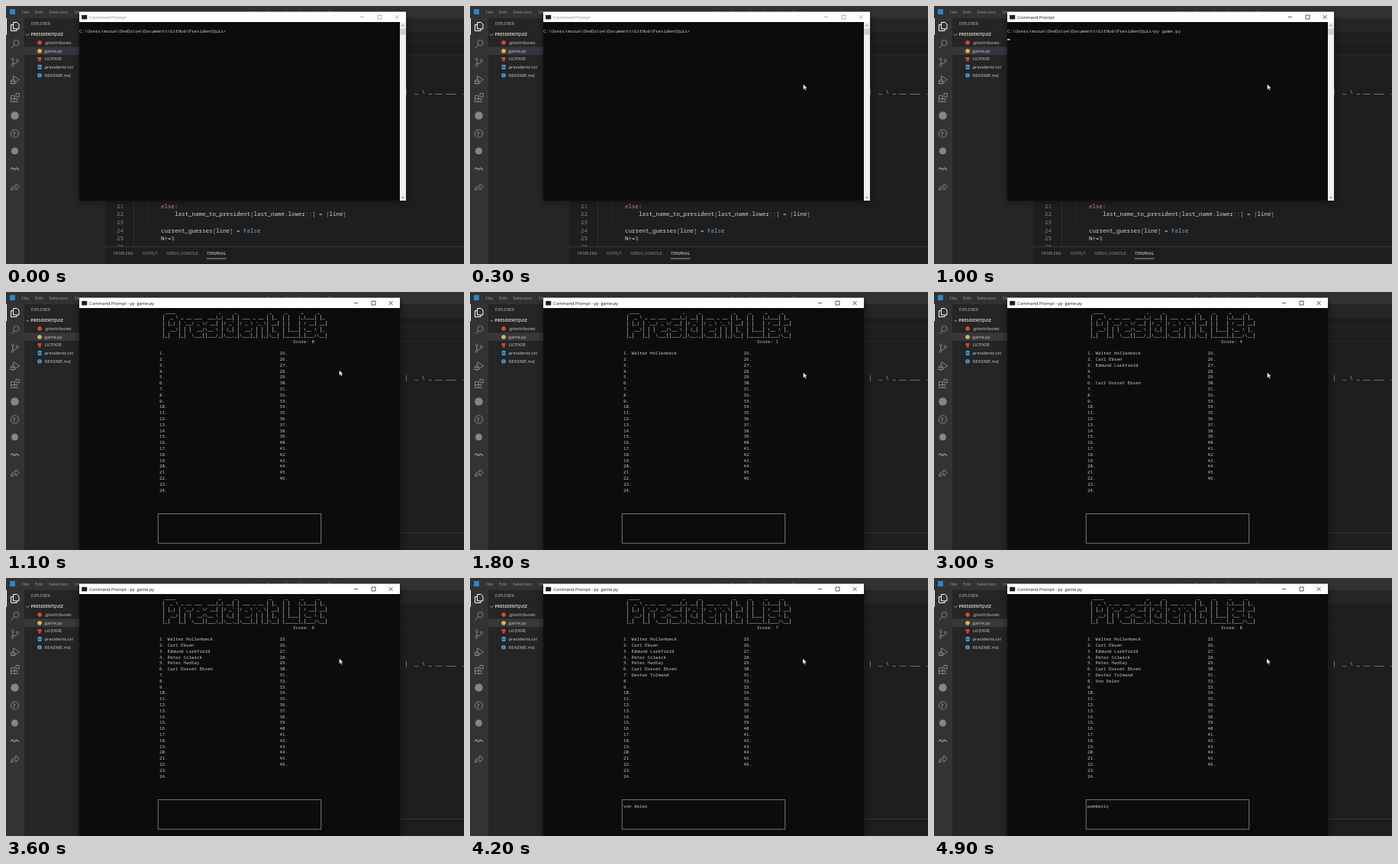
Write an HTML page with a canvas that moves like this. It is 600 by 338 pixels and loops after 5 s.

```html
<!DOCTYPE html>
<html lang="en">
<head>
<meta charset="utf-8">
<title>Quiz in a console</title>
<style>
html, body { margin: 0; width: 100%; height: 100%; overflow: hidden; background: #1e1e1e; }
canvas { display: block; width: 600px; height: 338px; }
</style>
</head>
<body>
<canvas id="stage"></canvas>
<script>
const W = 600, H = 338, LOOP = 5000, STEP = 100;
const UI = '"Open Sans", "Noto Sans", sans-serif';
const MONO = '"Noto Sans Mono", "DejaVu Sans Mono", monospace';
const canvas = document.getElementById('stage');
const ctx = canvas.getContext('2d');
const dpr = window.devicePixelRatio || 1;
canvas.width = W * dpr;
canvas.height = H * dpr;

// Console character grid
const CELL_W = 3.5, CELL_H = 7.8, ORIGIN_X = 96, ORIGIN_Y = 25.5;
const INK = '#cccccc', BLACK = '#0c0c0c';

const PROMPT = 'C:\\Users\\moruk\\OneDrive\\Documents\\GitHub\\PresidentQuiz>';
const COMMAND = 'py game.py';
const BANNER = [
  ' ____                _     _            _     _     _     _   ',
  '|  _ \\ _ __ ___  ___(_) __| | ___ _ __ | |_  | |   (_)___| |_ ',
  "| |_) | '__/ _ \\/ __| |/ _` |/ _ \\ '_ \\| __| | |   | / __| __|",
  '|  __/| | |  __/\\__ \\ | (_| |  __/ | | | |_  | |___| \\__ \\ |_ ',
  '|_|   |_|  \\___||___/_|\\__,_|\\___|_| |_|\\__| |_____|_|___/\\__|'
];

// Each guess: typed text, start of typing, letters per step, time of entry, answers by number
const GUESSES = [
  { text: 'hollenbeck', from: 1400, rate: 2.5, enter: 1800, found: { 1: 'Walter Hollenbeck' } },
  { text: 'ebsen', from: 1900, rate: 1, enter: 2400, found: { 2: 'Carl Ebsen', 6: 'Carl Dorset Ebsen' } },
  { text: 'larkfield', from: 2500, rate: 3, enter: 2800, found: { 3: 'Edmund Larkfield' } },
  { text: 'colwick', from: 3200, rate: 4, enter: 3400, found: { 4: 'Peter Colwick' } },
  { text: 'hadley', from: 3500, rate: 6, enter: 3600, found: { 5: 'Peter Hadley' } },
  { text: 'tolmand', from: 3800, rate: 7, enter: 3900, found: { 7: 'Dexter Tolmand' } },
  { text: 'von deler', from: 4200, rate: 9, enter: 4300, found: { 8: 'Von Deler' } },
  { text: 'pemberly', from: 4800, rate: 4, enter: LOOP, found: {} }
];

function rect(x, y, w, h, color) {
  ctx.fillStyle = color;
  ctx.fillRect(x, y, w, h);
}

function disc(x, y, r, color) {
  ctx.fillStyle = color;
  ctx.beginPath();
  ctx.arc(x, y, r, 0, 7);
  ctx.fill();
}

function stroke(path, color, width = 1) {
  ctx.strokeStyle = color;
  ctx.lineWidth = width;
  ctx.stroke(new Path2D(path));
}

// y is the middle of the capitals
function text(str, x, y, size, color, family = UI, weight = 400) {
  ctx.font = `${weight} ${size}px ${family}`;
  ctx.fillStyle = color;
  ctx.fillText(str, x, y + size * 0.345);
}

function put(str, col, row, weight = 400) {
  text(str, ORIGIN_X + col * CELL_W, ORIGIN_Y + row * CELL_H, CELL_W / 0.6, INK, MONO, weight);
}

function code(parts, x, y) {
  for (const [str, color] of parts) {
    text(str, x, y, 7.5, color, MONO);
    x += str.length * 4.5;
  }
}

function drawActivityBar() {
  const dim = '#858585';
  rect(0, 16, 24, H, '#333333');
  rect(0, 16, 1, 22, '#ffffff');
  stroke('M9.5 21.5h5l2.5 2.5v6h-7.5zM9.5 24.5h-3v8h7.5v-2.5', '#ffffff');
  stroke('M9.8 48.2a3.6 3.6 0 1 1 7.2 0a3.6 3.6 0 1 1 -7.2 0M10.8 50.8l-4.2 4.4', dim);
  stroke('M7.4 69.5a1.5 1.5 0 1 1 3 0a1.5 1.5 0 1 1 -3 0M7.4 77.5a1.5 1.5 0 1 1 3 0a1.5 1.5 0 1 1 -3 0' +
    'M13.6 71.5a1.5 1.5 0 1 1 3 0a1.5 1.5 0 1 1 -3 0M8.9 71v5M15.1 73q0 2.2 -6 2.5', dim);
  stroke('M9.5 96v-4.5l8 5.2l-6 4M6.8 98.5a2.2 2.2 0 1 1 4.4 0v1.5a2.2 2.2 0 1 1 -4.4 0zM5.5 98.5h7M5.5 101.5h7', dim);
  stroke('M6.5 117.5h4.5v8h-4.5zM6.5 121.5h8.5v4h-8.5M13 114.5h4.3v4.3h-4.3z', dim);
  disc(11.5, 143.5, 5.3, dim);
  stroke('M6.3 167a5.2 5.2 0 1 1 10.4 0a5.2 5.2 0 1 1 -10.4 0M10.2 163.8v6.4M10.5 165l3 2.5', dim);
  disc(11.5, 190, 4.6, dim);
  stroke('M6 213.5l2.5 -1.5l2.5 2.5l2.5 -2.5l3.5 2.5', dim, 1.6);
  stroke('M6.5 241.5q0 -6 6.5 -6v-3l4.3 4.3l-4.3 4.2v-3q-4 0 -6.5 3.5M8.5 241.5h2', dim);
}

function drawExplorer() {
  const size = 5.9, color = '#cccccc';
  rect(24, 16, 106, H, '#252526');
  rect(24, 53.5, 106, 10.6, '#37373d');
  text('EXPLORER', 33, 23.5, 5.2, '#bbbbbb');
  stroke('M26.2 36.6l2 2l2 -2', color, 0.8);
  text('PRESIDENTQUIZ', 32.5, 37.5, 5.4, color, UI, 700);
  ['.gitattributes', 'game.py', 'LICENSE', 'presidents.txt', 'README.md'].forEach((name, i) =>
    text(name, 50.5, 48.2 + i * 10.6, size, color));
  disc(44, 48, 2.8, '#d64a35');
  disc(44, 59, 2.8, '#d9bd45');
  rect(41.5, 67, 5, 3.4, '#cf4436');
  rect(42.6, 70.4, 2.8, 2.2, '#cf4436');
  rect(41.7, 77, 4.8, 6, '#4b9fd5');
  rect(42.6, 79, 3, 0.6, '#252526');
  rect(42.6, 80.6, 3, 0.6, '#252526');
  disc(44, 90.8, 2.9, '#4a9ad4');
  rect(43.6, 90.2, 0.8, 2.3, '#252526');
  rect(43.6, 88.8, 0.8, 0.8, '#252526');
}

function drawEditor() {
  const plain = '#d4d4d4', blue = '#4fb6e8', red = '#8e2f35', num = '#858585';
  rect(130, 16, W, H, '#1e1e1e');
  rect(130, 16, W, 18, '#252526');
  rect(130, 45.5, W, 0.8, '#2a2a2b');
  rect(130, 64, W, 0.8, '#2a2a2b');
  code([['|  ', '#c8b09a'], ['_ \\ _ __ ___  ___', '#cbab80']], 522, 112.5);

  rect(167, 250, 0.6, 67, '#363636');
  rect(185, 250, 0.6, 39, '#363636');
  for (let n = 21; n <= 26; n++) code([[String(n), num]], 145, 262 + (n - 21) * 10.7);
  code([['else', '#c08abd'], [':', plain]], 203, 262);
  code([['last_name_to_president', plain], ['[', blue], ['last_name.lower', plain], ['()', red],
    [']', blue], [' = ', plain], ['[', blue], ['line', plain], [']', blue]], 221, 272.7);
  code([['current_guesses', plain], ['[', blue], ['line', plain], [']', blue],
    [' = ', plain], ['False', '#72aeda']], 203, 294.1);
  code([['N+=', plain], ['1', '#b5cea8']], 203, 304.8);

  rect(130, 315, W, H, '#1e1e1e');
  rect(130, 315, W, 1, '#383838');
  text('PROBLEMS', 140.5, 324, 5.1, '#969696');
  text('OUTPUT', 178.5, 324, 5.1, '#969696');
  text('DEBUG CONSOLE', 210, 324, 5.1, '#969696');
  text('TERMINAL', 263.3, 324, 5.15, '#e7e7e7');
  rect(263, 330.6, 25.5, 0.7, '#d8d8d8');
}

function drawMenu() {
  rect(0, 0, W, 16, '#323233');
  rect(5, 4, 7, 7, '#2489ca');
  const color = '#989898';
  text('File', 20.5, 7.8, 5.9, color);
  text('Edit', 38, 7.8, 5.9, color);
  text('Selection', 56.3, 7.8, 5.9, color);
  text('View', 90, 7.8, 5.9, color);
  text('game.py - PresidentQuiz - Modern Script Desk', 315, 8, 5.6, '#777777');
}

function drawFrame(right, bottom, title, active) {
  const ink = active ? '#111111' : '#888888';
  ctx.save();
  ctx.shadowColor = 'rgba(0, 0, 0, 0.45)';
  ctx.shadowBlur = 9 * dpr;
  ctx.shadowOffsetY = 2 * dpr;
  rect(96, 7.5, right - 96, bottom - 7.5, BLACK);
  ctx.restore();
  rect(96, 7.5, right - 96, 13.5, '#ffffff');
  rect(99.2, 11.8, 7, 5.6, '#1c1c1c');
  text(title, 109, 14.6, 5.65, ink);
  const x = right - 12;
  stroke(`M${x - 48} 14.4h5`, ink, 0.7);
  stroke(`M${x - 25} 12h5v5h-5z`, ink, 0.7);
  stroke(`M${x - 2.4} 12l5 5m0 -5l-5 5`, ink, 0.7);
}

function drawScrollbar() {
  rect(516, 21, 8, 234, '#f0f0f0');
  rect(516.4, 29.5, 7.2, 8, '#cdcdcd');
  stroke('M518.3 26.4l1.7 -1.7l1.7 1.7M518.3 250l1.7 1.7l1.7 -1.7', '#505050', 0.9);
}

function drawShell(t) {
  drawFrame(524, 255, 'Command Prompt', t >= 400);
  drawScrollbar();
  const typed = COMMAND.slice(0, Math.max(0, (t - 400) / STEP * 2));
  put(PROMPT + typed, 0, 1);
  if (t >= 500) {
    const done = t >= 1000;
    const col = done ? 0 : PROMPT.length + typed.length;
    const row = done ? 2 : 1;
    rect(ORIGIN_X + col * CELL_W, ORIGIN_Y + row * CELL_H + 2.1, CELL_W, 1.7, INK);
  }
}

// Upright bars fill the cell height so that the letters join up
function drawBanner(col) {
  BANNER.forEach((line, row) => {
    put(line.replaceAll('|', ' '), col, row, 500);
    [...line].forEach((char, i) => {
      if (char !== '|') return;
      const x = ORIGIN_X + (col + i + 0.5) * CELL_W;
      rect(x - 0.3, ORIGIN_Y + row * CELL_H - 3.3, 0.6, 7.2, INK);
    });
  });
}

function drawQuiz(t) {
  drawFrame(516, H + 10, 'Command Prompt - py  game.py', true);
  drawBanner(31);

  const found = {};
  let input = '';
  for (const g of GUESSES) {
    if (t >= g.enter) Object.assign(found, g.found);
    else if (t >= g.from) input = g.text.slice(0, ((t - g.from) / STEP + 1) * g.rate);
  }
  put('Score: ' + Object.keys(found).length, 80, 5);
  for (let n = 1; n <= 46; n++) {
    const second = n > 24;
    const label = (n + '.').padEnd(3);
    put(label + (found[n] || ''), second ? 75 : 30, 7 + (second ? n - 25 : n - 1));
  }
  stroke('M199.25 290.5H412.75V329.2H199.25Z', '#a8a8a8', 0.7);
  put(input, 30, 35);
}

function drawPointer(t) {
  if (t < 100) return;
  let x = 436.6, y = 102.4;
  if (t < 300) {
    const away = (300 - t) / 200;
    x += 14 * away * away;
    y += 18 * away * away;
  }
  if (t >= 1500) y += 3;
  if (t >= 4200) x -= 0.6;
  const arrow = new Path2D(`M${x} ${y}v7l1.6 -1.4l1.2 2.6l1.2 -.5l-1.2 -2.6h2.2z`);
  ctx.fillStyle = '#ffffff';
  ctx.fill(arrow);
  ctx.strokeStyle = '#000000';
  ctx.lineWidth = 0.3;
  ctx.stroke(arrow);
}

function draw(now) {
  const t = Math.floor((now % LOOP) / STEP) * STEP;
  ctx.setTransform(dpr, 0, 0, dpr, 0, 0);
  drawEditor();
  drawExplorer();
  drawActivityBar();
  drawMenu();
  if (t < 1100) drawShell(t);
  else drawQuiz(t);
  drawPointer(t);
}

const start = performance.now();
function tick() {
  draw(performance.now() - start);
  requestAnimationFrame(tick);
}
tick();
</script>
</body>
</html>
```
